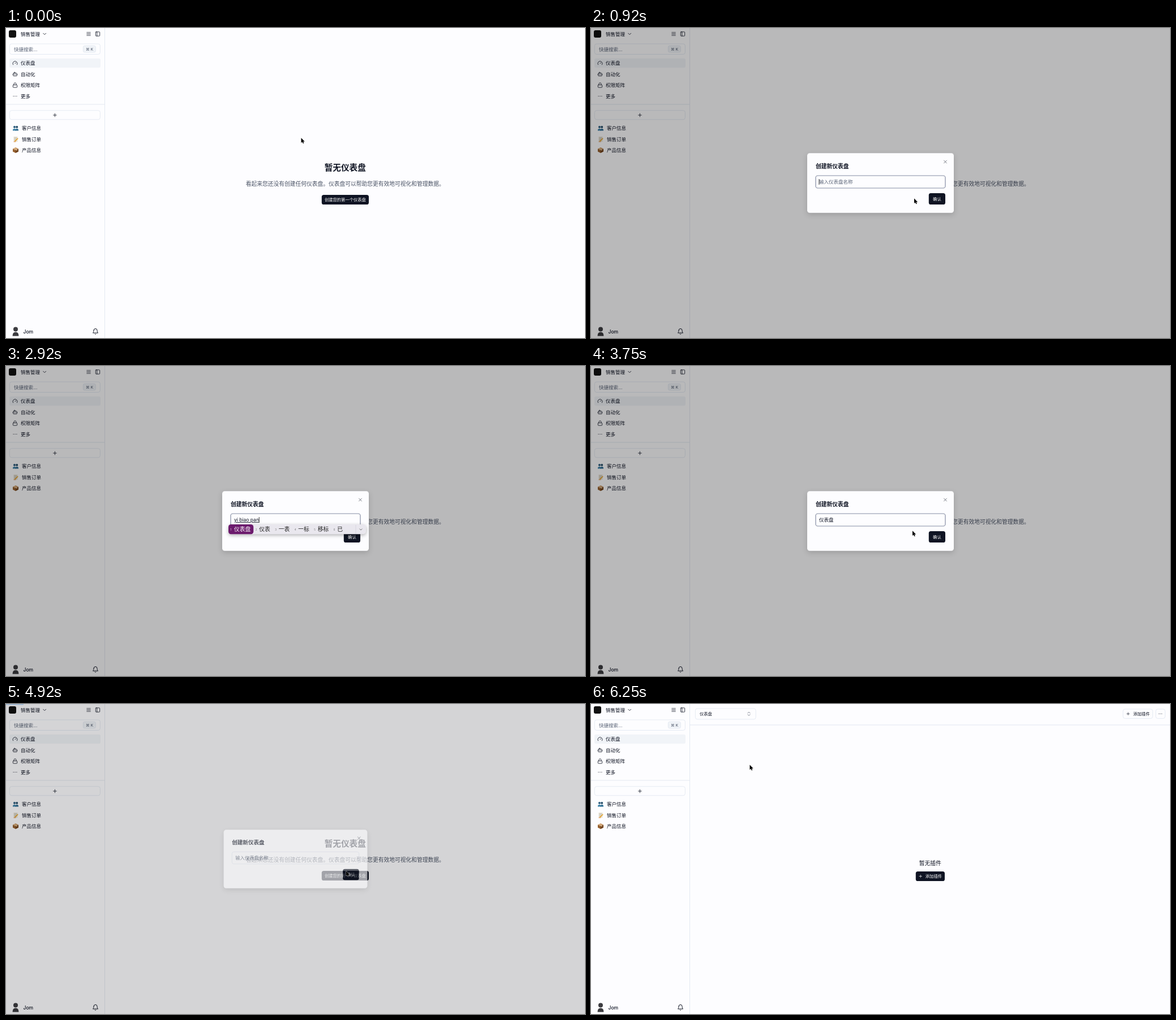
An HTML page for the animation above (6760 ms loop, 1023 px wide and 548 px high).

```html
<!DOCTYPE html>
<html lang="zh-CN">
<head>
<meta charset="utf-8">
<title>创建仪表盘</title>
<style>
  html, body { margin: 0; width: 100%; height: 100%; overflow: hidden; background: #fdfdff; }
  svg { display: block; width: 100vw; height: 100vh; }
  text { font-family: Inter, "Noto Sans CJK SC", "Noto Sans CJK", "DejaVu Sans", sans-serif; white-space: pre; }
  #dialog { filter: drop-shadow(0 3px 5px rgba(0, 0, 0, .16)); }
  #ime { filter: drop-shadow(0 2px 3px rgba(0, 0, 0, .3)); }
</style>
</head>
<body>
<svg id="stage" viewBox="0 0 1023 548" preserveAspectRatio="none"></svg>
<script>
const LOOP = 6760;
const INK = '#0f1423', MUTED = '#5b6577', LINE = '#e0e6f0', PAGE = '#fdfdff';
const SMALL = 7.31, BASE = 8.53, LARGE = 9.75;

// 24-unit line icons
const ICONS = {
  gauge: 'm12 14 4-4M3.34 19a10 10 0 1 1 17.32 0',
  bot: 'M12 8V4H8M6 8h12a2 2 0 0 1 2 2v8a2 2 0 0 1-2 2H6a2 2 0 0 1-2-2v-8a2 2 0 0 1 2-2ZM2 14h2M20 14h2M15 13v2M9 13v2',
  lock: 'M5 11h14a2 2 0 0 1 2 2v7a2 2 0 0 1-2 2H5a2 2 0 0 1-2-2v-7a2 2 0 0 1 2-2ZM7 11V7a5 5 0 0 1 10 0v4',
  more: 'M4.5 12h1M11.5 12h1M18.5 12h1',
  plus: 'M5 12h14M12 5v14',
  bell: 'M6 8a6 6 0 0 1 12 0c0 7 3 9 3 9H3s3-2 3-9M10.3 21a1.94 1.94 0 0 0 3.4 0',
  updown: 'm7 15 5 5 5-5M7 9l5-5 5 5',
  close: 'M18 6 6 18M6 6l12 12',
  down: 'm6 9 6 6 6-6',
  menu: 'M4 5.5h16M4 12h16M4 18.5h16',
  panel: 'M5 3h14a2 2 0 0 1 2 2v14a2 2 0 0 1-2 2H5a2 2 0 0 1-2-2V5a2 2 0 0 1 2-2ZM9 3v18'
};

const icon = (name, cx, cy, size = LARGE, color = INK) =>
  `<path d="${ICONS[name]}" transform="translate(${cx - size / 2} ${cy - size / 2}) scale(${size / 24})"
    fill="none" stroke="${color}" stroke-width="2" stroke-linecap="round" stroke-linejoin="round"/>`;
// cy is the visual middle of the line of text
const text = (x, cy, size, str, { color = INK, weight = 500, anchor = 'start', id = '' } = {}) =>
  `<text id="${id}" x="${x}" y="${cy + size * .37}" font-size="${size}" fill="${color}"
    font-weight="${weight}" text-anchor="${anchor}">${str}</text>`;
const box = (x, y, w, h, fill, stroke = 'none', r = 3.6, id = '') =>
  `<rect id="${id}" x="${x}" y="${y}" width="${w}" height="${h}" rx="${r}" fill="${fill}" stroke="${stroke}" stroke-width=".8"/>`;
const white = { color: '#fff' }, middle = { anchor: 'middle' };

const people = `<g transform="translate(12 172)">
  <circle cx="3" cy="3" r="2" fill="#2f5f80"/><path d="M0 9.5V7.4Q3 4 6 7.4V9.5Z" fill="#4084aa"/>
  <circle cx="7.2" cy="3" r="2" fill="#244c68"/><path d="M4.6 9.5V7.4Q7.2 4 10 7.4V9.5Z" fill="#326f94"/></g>`;
const memo = `<g transform="translate(12.5 192)"><path d="M1 0H8V9H1Z" fill="#e9e3d3"/>
  <path d="M2 2H7M2 4H7M2 6H5" stroke="#a5a5a5" stroke-width=".6"/>
  <path d="M3 8.3 8.6 3" stroke="#e5a32c" stroke-width="1.7"/><path d="M1 9H5" stroke="#d98a48"/></g>`;
const parcel = `<g transform="translate(12 211)"><path d="M0 2.4 5 0 10 2.4 5 5Z" fill="#c99a68"/>
  <path d="M0 2.4 5 5V10L0 7.6Z" fill="#95602f"/><path d="M10 2.4 5 5V10L10 7.6Z" fill="#70421d"/>
  <path d="M2 1.4 7 4V6" fill="none" stroke="#e5c79a"/></g>`;
const avatar = `<g fill="#3c3c40"><circle cx="17" cy="532.5" r="4"/><path d="M11.5 544.5Q11.5 537.5 17 537.5T22.5 544.5Z"/></g>`;

const sidebar = `
  <path d="M174.5 0V548M0 135H174" stroke="${LINE}" stroke-width=".9"/>
  ${box(5, 4, 13, 13, '#111', 'none', 3)}
  ${text(26, 10.5, BASE, '销售管理')}
  ${icon('down', 68.2, 10.5)}${icon('menu', 146, 10.5)}${icon('panel', 162, 10.5)}
  ${box(6.4, 28, 160, 18.5, PAGE, LINE)}
  ${text(14, 37.5, BASE, '快捷搜索...', { color: MUTED, weight: 400 })}
  ${box(136.4, 31.4, 22, 11.5, '#f1f4f8', LINE, 2.5)}
  ${text(147.5, 37.3, 6.8, '⌘ K', { color: MUTED, ...middle })}
  ${box(6, 53.7, 161, 16.5, '#f1f4f8', 'none', 3)}
  ${[['gauge', '仪表盘'], ['bot', '自动化'], ['lock', '权限矩阵'], ['more', '更多']].map(([name, label], i) =>
    icon(name, 16, 62 + i * 19.5) + text(26, 62 + i * 19.5, BASE, label)).join('')}
  ${box(6.4, 145.8, 160, 16, PAGE, LINE)}${icon('plus', 86.4, 154)}
  ${people}${memo}${parcel}
  ${['客户信息', '销售订单', '产品信息'].map((label, i) => text(28, 177.2 + i * 19.5, BASE, label)).join('')}
  ${avatar}${text(30.5, 536.7, BASE, 'Jom')}${icon('bell', 158, 536.5, 12)}`;

const emptyHome = `
  ${text(599.3, 246.5, 14.62, '暂无仪表盘', { weight: 700, ...middle })}
  ${text(423.7, 275.7, LARGE, '看起来您还没有创建任何仪表盘。仪表盘可以帮助您更有效地可视化和管理数据。', { color: '#4a5365', weight: 400 })}
  ${box(557.8, 295, 83.2, 17, INK, 'none', 3.6, 'create')}
  ${text(599.4, 303.6, SMALL, '创建您的第一个仪表盘', { ...white, ...middle })}`;

const dashboard = `
  <path d="M175 37H1023" stroke="${LINE}"/>
  ${box(184.4, 8, 106.8, 19, PAGE, LINE)}${text(192, 17.4, SMALL, '仪表盘')}${icon('updown', 279, 17.4, 9.5, '#555d6c')}
  ${box(940, 9, 52.4, 16.6, PAGE, LINE)}${icon('plus', 949, 17.3, 8)}${text(958, 17.4, SMALL, '添加插件')}
  ${box(997.8, 9, 16.6, 16.6, PAGE, LINE)}${icon('more', 1006, 17.3, 8.5)}
  <path id="spinner" d="M594.3 295A6.4 6.4 0 0 1 601 289.1" fill="none" stroke="#20242e" stroke-width="2"/>
  <g id="noPlugins">${text(599.3, 281.7, LARGE, '暂无插件', middle)}
    ${box(573.8, 296, 51.2, 17, INK)}${icon('plus', 582.3, 304.5, 8, '#fff')}${text(590.8, 304.6, SMALL, '添加插件', white)}</g>`;

const dialog = `
  ${box(382, 221.3, 259, 105.5, PAGE, 'none', 4.5)}
  ${text(397, 244, LARGE, '创建新仪表盘', { weight: 600 })}${icon('close', 626, 236.5, LARGE, '#5a5f6b')}
  ${box(397, 261, 229, 22, PAGE, LINE, 3.6, 'field')}
  ${text(403, 272, BASE, '输入仪表盘名称', { color: MUTED, weight: 400, id: 'placeholder' })}
  ${text(403, 272, BASE, '', { weight: 400, id: 'value' })}
  <path id="caret" d="M0 267V277" stroke="#000" stroke-width=".8"/>
  ${box(596.8, 292, 29.2, 20, INK, 'none', 3.6, 'confirm')}${text(611.4, 302.2, SMALL, '确认', { ...white, ...middle })}
  <g id="ime"></g>`;

function imePanel(words) {
  let x = 393;
  const cells = words.map((word, i) => {
    const width = 15 + word.length * LARGE, left = x, first = i === 0;
    x += width;
    return (first ? box(left, 280, width, 17.3, '#6c1a6d', 'none', 4.5) : '') +
      text(left + 3.5, 289, 4.4, i + 1, { color: first ? '#fff' : '#777', weight: 400 }) +
      text(left + 10, 288.7, LARGE, word, { color: first ? '#fff' : '#222', weight: 400 });
  });
  return box(393, 280, 243, 17.3, '#e9e7ee', 'none', 5) +
    `<path d="M618 281V297" stroke="#d2cfda" stroke-width=".7"/>` + cells.join('') + icon('down', 627, 289, 8.5, '#444');
}

document.getElementById('stage').innerHTML = `
  <rect width="1023" height="548" fill="${PAGE}"/>
  ${sidebar}
  <g id="home">${emptyHome}</g><g id="dashboard">${dashboard}</g>
  <rect id="progress" height="1.6" fill="#b9dafc"/>
  <rect id="shade" width="1023" height="548"/>
  <g id="dialog">${dialog}</g>
  <path id="arrow" d="M.5 .3V9L2.5 7.2 3.8 10.2 5.3 9.5 4 6.7H6.7Z" stroke="#fff" stroke-width=".7" paint-order="stroke"/>
  <path id="beam" d="M-2 -5Q0 -5 0 -3.5Q0 -5 2 -5M0 -4V4M-2 5Q0 5 0 3.5Q0 5 2 5" fill="none" stroke="#222" stroke-width=".8"/>`;

const el = Object.fromEntries([...document.querySelectorAll('[id]')].filter(n => n.id).map(n => [n.id, n]));
const show = (node, on) => node.setAttribute('display', on ? 'inline' : 'none');
const set = (node, attrs) => { for (const k in attrs) node.setAttribute(k, attrs[k]); };

// Screen recording: each value holds until the next time
const POINTER = [
  [0, 521, 194], [170, 541, 250], [250, 554, 285], [420, 566, 297], [500, 570.5, 301],
  [1170, 526, 271], [1250, 505.5, 258], [1750, 509, 263.5, 'beam'], [1920, 0, 0, 'none'],
  [3500, 506, 259], [3670, 550, 281], [3750, 567.5, 291], [3920, 586, 293], [4000, 596.5, 294],
  [4420, 600, 295], [4500, 603, 296], [4670, 602, 296], [4750, 600.5, 295],
  [5000, 310, 126], [5170, 288, 112], [5250, 279, 107], [5750, 278.5, 107], [6000, 279, 107], [6250, 280, 107.3]
];
const TYPED = [[0, ''], [1920, 'y'], [2000, 'yi'], [2170, 'yi b'], [2420, 'yi biao'], [2920, 'yi biao pan'], [3250, '仪表盘'], [4920, '']];
const WORDS = [
  [0, ''], [2170, '一步 一般 一笔 一波 一半 一百'], [2420, '仪表 一表 一标 移标 已表 衣标'],
  [2920, '仪表盘 仪表 一表 一标 移标 已'], [3250, '']
];
const PROGRESS = [[0, 0], [4920, 31], [5000, 75], [5170, 90], [5250, 102], [5420, 560], [5500, 1023], [5670, 0]];
const held = (track, t) => track.findLast(([start]) => start <= t).slice(1);
const within = (t, from, to) => t >= from && t < to;

let lastWords = null;

function render(t) {
  const closing = t >= 4920, open = within(t, 920, 5000);
  show(el.home, t < 5000);
  show(el.dashboard, t >= 5000);
  show(el.spinner, t < 5170);
  show(el.noPlugins, t >= 5170);
  set(el.progress, { width: held(PROGRESS, t)[0] });
  set(el.create, { fill: within(t, 420, 920) ? '#292e3c' : INK });

  show(el.shade, open);
  show(el.dialog, open);
  set(el.shade, { opacity: closing ? .16 : .27 });
  set(el.dialog, {
    opacity: closing ? .62 : 1,
    transform: closing ? 'translate(511.5 274) scale(.98) translate(-511.5 -274)' : ''
  });
  const focused = t < 4170;
  set(el.field, { stroke: focused ? '#858da3' : LINE, 'stroke-width': focused ? 1.2 : .8 });
  set(el.confirm, { fill: within(t, 4170, 4920) ? '#292e3c' : INK });

  const [typed] = held(TYPED, t), composing = within(t, 1920, 3250);
  show(el.placeholder, !typed);
  el.value.textContent = typed;
  set(el.value, { 'text-decoration': composing ? 'underline' : 'none', 'font-weight': composing ? 400 : 500 });
  show(el.caret, within(t, 920, 1170) || within(t, 1920, 3670));
  if (open) set(el.caret, { transform: `translate(${403 + (typed ? el.value.getComputedTextLength() + .3 : 0)} 0)` });

  const [words] = held(WORDS, t);
  if (words !== lastWords) {
    el.ime.innerHTML = words ? imePanel(words.split(' ')) : '';
    lastWords = words;
  }

  const [x, y, kind = 'arrow'] = held(POINTER, t);
  for (const name of ['arrow', 'beam']) {
    show(el[name], kind === name);
    set(el[name], { transform: `translate(${x} ${y})` });
  }
}

const start = performance.now();
function tick() {
  render((performance.now() - start) % LOOP);
  requestAnimationFrame(tick);
}
tick();
</script>
</body>
</html>
```
